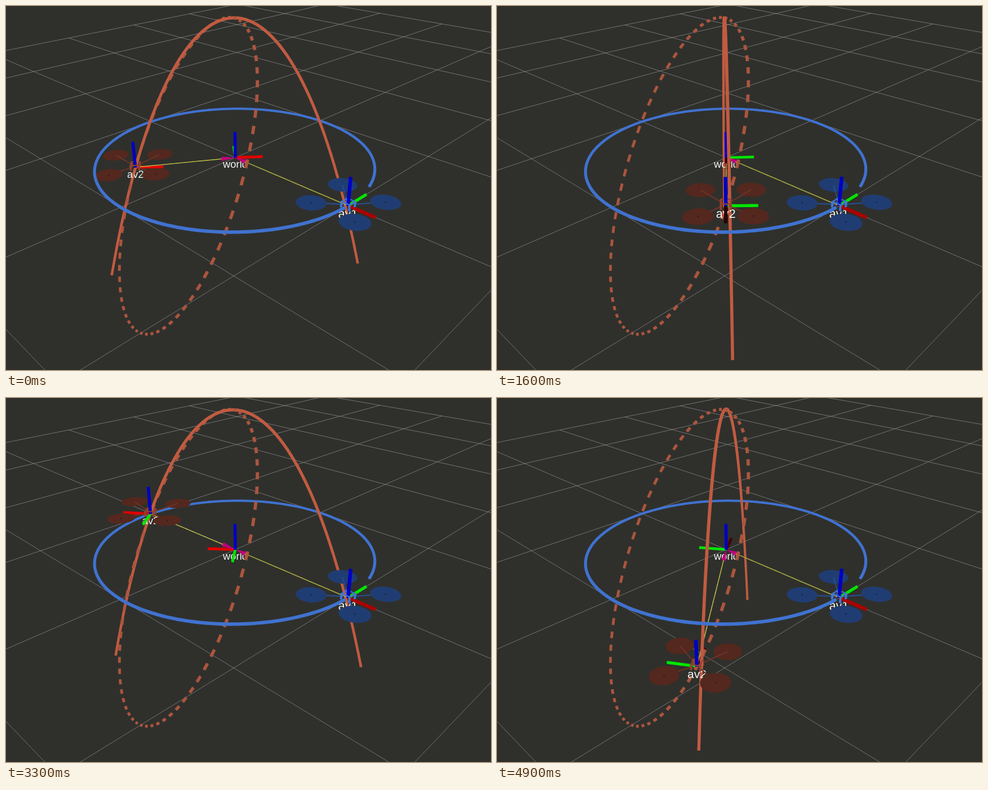
Write an HTML page with a canvas that moves like this. It is 861 px wide and 646 px high and loops after 5000 ms.

```html
<!DOCTYPE html>
<html lang="en">
<head>
<meta charset="utf-8">
<title>Two drones in a moving frame</title>
<style>
html, body { margin: 0; width: 100%; height: 100%; overflow: hidden; background: #2f302c; }
canvas { display: block; }
</style>
</head>
<body>
<canvas id="view" width="861" height="646"></canvas>
<script>
const ctx = document.getElementById('view').getContext('2d');
const RAD = Math.PI / 180;
const LOOP = 5000, STEP = 100;

// Camera; points are [right, forward, up] around the world origin.
const FOCAL = 1027, CX = 430, CY = 323, DIST = 4.2205;
const SIN = 0.4768, COS = 0.8791;
const AV1_DIR = -44.2, TRAIL_DIR = -42.2;

const polar = (r, deg, z = 0) => [r * Math.cos(deg * RAD), r * Math.sin(deg * RAD), z];
const add = (p, q) => p.map((v, i) => v + q[i]);
const mix = (p, q, k) => p.map((v, i) => v + (q[i] - v) * k);
const depthOf = p => DIST + p[1] * COS - p[2] * SIN;

function project(p) {
  const d = depthOf(p);
  return [CX + (-97.1 + FOCAL * p[0]) / d,
          CY + (-227.9 - FOCAL * (p[1] * SIN + p[2] * COS)) / d, d];
}

let queue = [];
const push = (depth, draw) => queue.push({ depth, draw });

function segment(p, q, width, color, lap = 0.6, bias = 0) {
  const [x1, y1, d1] = project(p), [x2, y2, d2] = project(q);
  const depth = (d1 + d2) / 2;
  push(depth + bias, () => {
    const len = Math.hypot(x2 - x1, y2 - y1) || 1;
    const ex = (x2 - x1) / len * lap, ey = (y2 - y1) / len * lap;
    ctx.strokeStyle = color;
    ctx.lineWidth = Math.max(1, width * FOCAL / depth);
    ctx.beginPath();
    ctx.moveTo(x1 - ex, y1 - ey);
    ctx.lineTo(x2 + ex, y2 + ey);
    ctx.stroke();
  });
}

function line(p, q, width, color, parts = 1, bias = 0) {
  for (let i = 0; i < parts; i++)
    segment(mix(p, q, i / parts), mix(p, q, (i + 1) / parts), width, color, 0.6, bias);
}

function curve(fn, from, to, parts, width, color) {
  const at = i => fn(from + (to - from) * i / parts);
  for (let i = 0; i < parts; i++) segment(at(i), at(i + 1), width, color);
}

function grid() {
  const spot = (x, y) => add(polar(x, AV1_DIR), polar(y, AV1_DIR + 90));
  const stroke = (p, q) => {
    const n = 40;
    ctx.beginPath();
    let open = false;
    for (let i = 0; i <= n; i++) {
      const [x, y, d] = project(mix(p, q, i / n));
      if (d < 0.3) { open = false; continue; }
      open ? ctx.lineTo(x, y) : ctx.moveTo(x, y);
      open = true;
    }
    ctx.stroke();
  };
  ctx.strokeStyle = 'rgba(160,160,164,.6)';
  ctx.lineWidth = 1;
  for (let k = -5; k <= 5; k++) {
    stroke(spot(-4, k), spot(6, k));
    stroke(spot(k + 1, -5), spot(k + 1, 5));
  }
}

function axes(o, dir) {
  const red = Math.round(40 + 185 * Math.abs(Math.cos(dir * RAD)));
  line(o, add(o, polar(0.2, dir)), 0.021, `rgb(${red},0,0)`, 4);
  line(o, add(o, polar(0.2, dir + 90)), 0.019, '#00e600', 4);
  line(o, add(o, [0, 0, 0.2]), 0.022, '#0000c4', 4, -0.04);
}

function label(o, text) {
  const [x, y, d] = project(o);
  push(d, () => {
    const size = 77.7 / d;
    ctx.font = `${size}px "Liberation Sans", Arial, sans-serif`;
    ctx.textAlign = 'center';
    ctx.fillStyle = '#f4f4f4';
    ctx.fillText(text, x, y + size);
  });
}

// Shaft from a drone to the world origin with a cone at the origin.
function link(o, color) {
  const k = 0.1 / Math.hypot(...o);
  const base = mix([0, 0, 0], o, k);
  line(base, o, 0.006, color, 12);
  const [x, y, d] = project([0, 0, 0]), [bx, by] = project(base);
  push(d - 0.01, () => {
    const len = Math.hypot(bx - x, by - y) || 1;
    const nx = (y - by) / len * 4, ny = (bx - x) / len * 4;
    ctx.fillStyle = '#c0007c';
    ctx.beginPath();
    ctx.moveTo(x, y);
    ctx.lineTo(bx + nx, by + ny);
    ctx.lineTo(bx - nx, by - ny);
    ctx.fill();
  });
}

function rotor(c, color) {
  const pts = [];
  for (let a = 0; a < 360; a += 10) pts.push(project(add(c, polar(0.095, a))));
  const [x, y, d] = project(c);
  push(d, () => {
    ctx.fillStyle = color;
    ctx.beginPath();
    pts.forEach(p => ctx.lineTo(p[0], p[1]));
    ctx.fill();
    ctx.fillStyle = 'rgba(15,15,20,.7)';
    ctx.fillRect(x - 1, y - 1, 2, 2);
  });
}

function drone(o, dir, skin) {
  for (let k = 0; k < 4; k++) {
    const a = dir + 45 + 90 * k;
    const hub = add(o, polar(0.232, a, 0.024));
    line(add(o, polar(0.03, a, 0.01)), hub, 0.008, skin.arm, 3);
    rotor(hub, skin.rotor);
    const lo = polar(0.043, a, -0.01), hi = polar(0.043, a, 0.03);
    line(add(o, lo), add(o, hi), 0.014, skin.body, 1, -0.02);
    line(add(o, hi), add(o, polar(0.043, a + 90, 0.03)), 0.008, skin.body, 1, -0.02);
  }
}

const blue = { rotor: '#203d73', arm: '#274c8c', body: '#4377cf' };
const rust = { rotor: '#54281e', arm: '#6e3326', body: '#8f432f' };

const height = deg => Math.cos(2 * deg * RAD);
const av2At = deg => polar(Math.sin(deg * RAD), AV1_DIR - deg, height(deg));

function scene(t) {
  const phase = -46.8 + 57.3 * t + 3.8 * Math.min(1, Math.max(0, (t - 3.3) / 0.9));
  const world = TRAIL_DIR - phase;
  const av1 = polar(1, AV1_DIR), av2 = av2At(phase);

  ctx.fillStyle = '#2f302c';
  ctx.fillRect(0, 0, 861, 646);
  grid();

  queue = [];
  curve(a => polar(1, a), -26.5, 314, 130, 0.02, '#4072d0');
  curve(a => polar(Math.sin(a * RAD), world, height(a)), -90, 90, 120, 0.02, '#c15b41');
  const dashes = 63, pitch = 180 / dashes;
  for (let i = 0; i < dashes; i++)
    segment(av2At(i * pitch), av2At((i + 0.5) * pitch), 0.02, '#ab553e', 0);

  link(av1, '#a8a83c');
  link(av2, '#bcbc46');
  axes([0, 0, 0], world);
  label([0, 0, 0], 'world');
  drone(av1, AV1_DIR, blue);
  axes(av1, AV1_DIR);
  label(av1, 'av1');
  drone(av2, AV1_DIR - phase, rust);
  axes(av2, AV1_DIR - phase);
  label(av2, 'av2');

  queue.sort((a, b) => b.depth - a.depth).forEach(item => item.draw());
}

const start = performance.now();
function tick() {
  const ms = (performance.now() - start) % LOOP;
  scene(Math.floor(ms / STEP) * STEP / 1000);
  requestAnimationFrame(tick);
}
tick();
</script>
</body>
</html>
```
